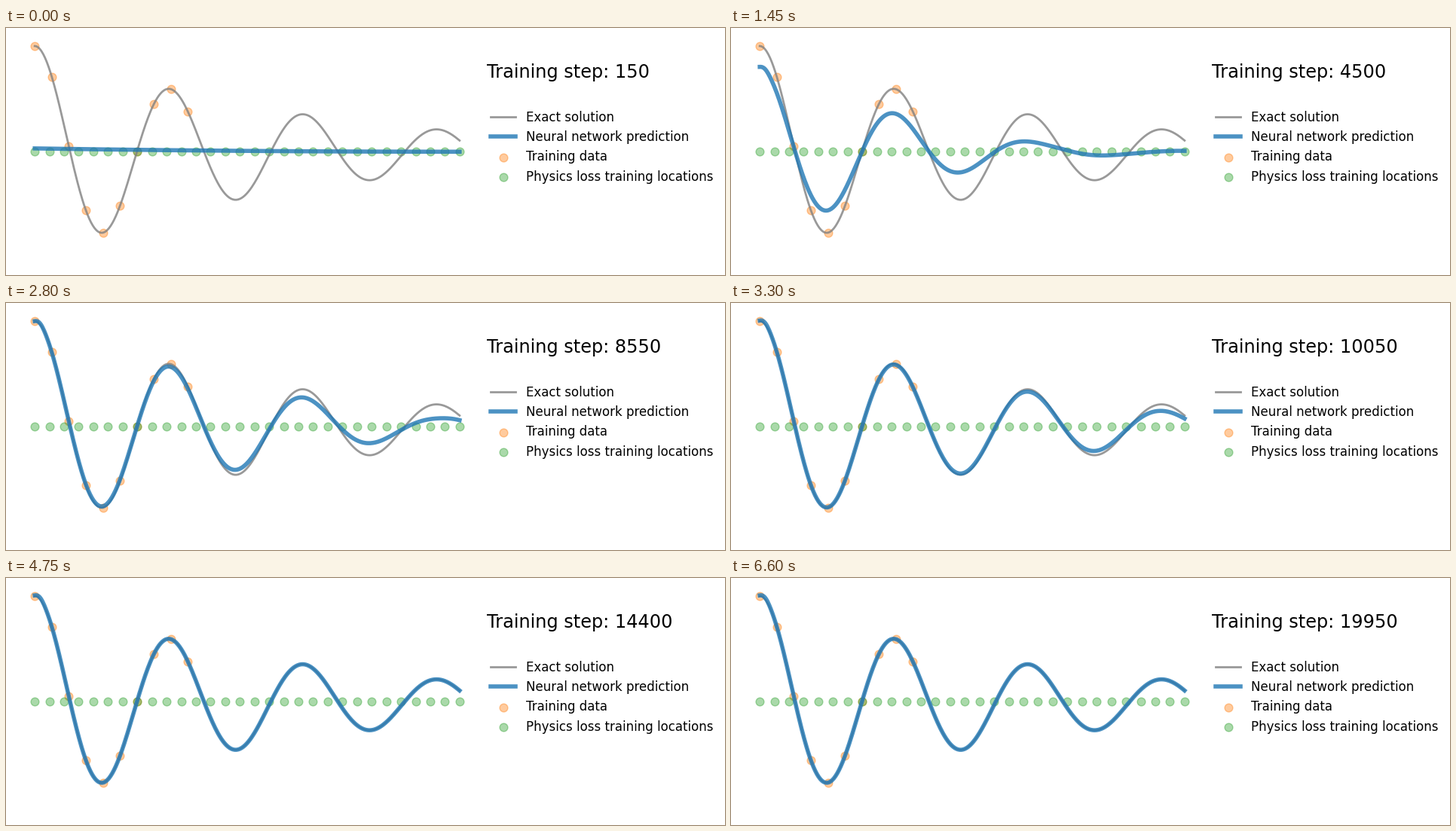
These frames come from a looping animation (954 px wide and 328 px high, 6650 ms). A matplotlib script:

```python
import numpy as np
import matplotlib.pyplot as plt
from matplotlib.animation import FuncAnimation

W, H, DPI = 954, 328, 100
FRAMES, INTERVAL, STEPS_PER_FRAME = 133, 50, 150
UNIT = 140  # pixels per data unit, vertically

plt.rcParams["font.family"] = "DejaVu Sans"


def oscillator(x, d=1.65, w0=20.0):
    """Underdamped harmonic oscillator released from rest at 1."""
    w = np.sqrt(w0**2 - d**2)
    phi = np.arctan(-d / w)
    return np.exp(-d * x) * np.cos(phi + w * x) / np.cos(phi)


def bump(x, centre, width):
    return np.exp(-(((x - centre) / width) ** 2) / 2)


x = np.linspace(0, 1, 500)
exact = oscillator(x)

# Early, almost flat guesses, in pixels
first_guess = 4.4 * (1 - x) ** 2 - 0.3
wavy_guess = 11.3 * np.exp(-x / 0.09) + 2.3 * np.cos(np.pi * (x - 0.58) / 0.42)


def prediction(step):
    s = step / 1000
    mix = np.clip((s - 0.15) / 2.85, 0, 1)
    guess = first_guess + mix * (wavy_guess - first_guess)

    # The fit wakes up after 3000 steps and spreads rightwards as a soft front
    amp = 1 - np.exp(-((max(s - 3, 0) / 1.13) ** 2))
    u = s - 6.3
    front = 0.64 + 0.0724 * u + 0.00327 * u**3
    gain = amp / (1 + np.exp((x - front) / 0.17))

    # Passing phase lag near the front, and small errors at both ends
    lag = 9 * bump(s, 6.3, 1.3) * (bump(x, 0.718, 0.045) - bump(x, 0.87, 0.06))
    tail = 5.8 * bump(s, 7.4, 1.6) * bump(x, 1, 0.035)
    start = 2.2 * bump(x, 0.012, 0.009)
    drift = (1 - amp) * guess + amp * (lag + tail + start)
    return gain * exact + drift / UNIT


fig = plt.figure(figsize=((W + 0.001) / DPI, (H + 0.001) / DPI), dpi=DPI,
                 facecolor="white")
ax = fig.add_axes([10 / W, 10 / H, 620 / W, 308 / H])
ax.set_xlim(-0.05, 1.05)
ax.set_ylim(-1.1, 1.1)
ax.axis("off")

ax.plot(x, exact, color="grey", lw=2, alpha=0.8, label="Exact solution")
curve, = ax.plot(x, exact, color="tab:blue", lw=4, alpha=0.8,
                 label="Neural network prediction")
ax.scatter(x[:200:20], exact[:200:20], s=60, color="tab:orange", alpha=0.4,
           label="Training data")
ax.scatter(np.linspace(0, 1, 30), np.zeros(30), s=60, color="tab:green",
           alpha=0.4, label="Physics loss training locations")
ax.legend(loc=(1.01, 0.34), frameon=False, fontsize="large", labelcolor="k")
title = ax.text(1.065, 0.7, "", fontsize="xx-large", color="k")


def update(i):
    step = STEPS_PER_FRAME * (i + 1)
    curve.set_ydata(prediction(step))
    title.set_text(f"Training step: {step}")
    return curve, title


anim = FuncAnimation(fig, update, frames=FRAMES, interval=INTERVAL,
                     repeat=True, repeat_delay=0, blit=False)
plt.show()
```
